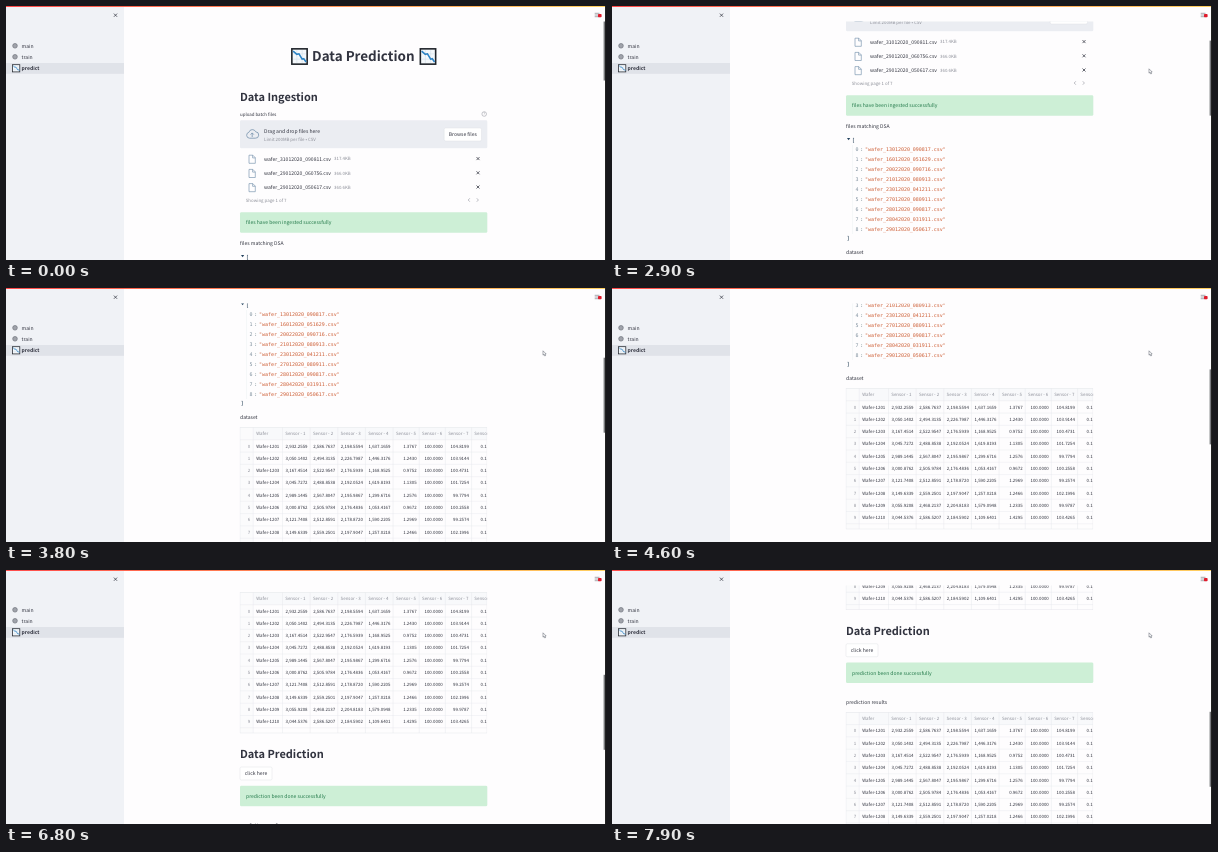
These frames come from a looping animation (600 by 254 pixels, 8000 ms). An HTML page:

```html
<!DOCTYPE html>
<html lang="en">
<head>
<meta charset="utf-8">
<title>Data Prediction</title>
<style>
html, body { margin: 0; width: 100%; height: 100%; overflow: hidden; background: #fefdfe; }
svg { display: block; width: 100vw; height: 100vh; }
text { font-family: "Noto Sans CJK JP", "Noto Sans CJK SC", "Noto Sans CJK", Lato, sans-serif; text-rendering: geometricPrecision; white-space: pre; }
.mono { font-family: "DejaVu Sans Mono", monospace; }
</style>
</head>
<body>
<svg id="stage" viewBox="0 0 600 254">
  <defs>
    <linearGradient id="bar"><stop stop-color="#ff4b4b"/><stop offset="1" stop-color="#ffd060"/></linearGradient>
    <clipPath id="view"><rect x="118" y="15.5" width="482" height="239"/></clipPath>
    <clipPath id="tableClip"><rect x="233.5" y="-1" width="247.7" height="143"/></clipPath>
  </defs>
  <rect width="600" height="254" fill="#fefdfe"/>
  <g clip-path="url(#view)">
    <g id="page"></g>
    <rect id="thumb" x="597.6" width="1.8" height="75" fill="#77787c"/>
  </g>
  <g id="chrome"></g>
  <rect x="599" width="1" height="254" fill="#222"/>
  <path id="cursor" d="M537 62.8v4.4l1-.9.8 1.7.8-.4-.8-1.6h1.4z" fill="#fff" stroke="#555a66" stroke-width=".5"/>
</svg>
<script>
const NS = "http://www.w3.org/2000/svg";
const INK = "#31333f", GREY = "#8d8f99", LINE = "#e4e5ea", STEEL = "#7893ae";
const BODY = 5.05, SMALL = 4.43;
const $ = id => document.getElementById(id);
const page = $("page"), chrome = $("chrome");

function add(parent, tag, attrs, content) {
  const el = document.createElementNS(NS, tag);
  for (const key in attrs) el.setAttribute(key, attrs[key]);
  if (content) el.textContent = content;
  parent.appendChild(el);
  return el;
}
// y is the middle of the capitals
function label(parent, x, y, content, size = BODY, fill = INK, extra = {}) {
  return add(parent, "text", { x, y: y + size * 0.36, "font-size": size, fill, ...extra }, content);
}
const box = (parent, x, y, width, height, fill, extra = {}) =>
  add(parent, "rect", { x, y, width, height, fill, ...extra });
const stroke = (parent, d, color, width, extra = {}) =>
  add(parent, "path", { d, stroke: color, "stroke-width": width, fill: "none", ...extra });
const cross = (parent, x, y, r) =>
  stroke(parent, `M${x - r} ${y - r}l${2 * r} ${2 * r}m0 ${-2 * r}l${-2 * r} ${2 * r}`, INK, 0.75);

function chartIcon(parent, x, y, size) {
  const g = add(parent, "g", { transform: `translate(${x} ${y}) scale(${size / 16})` });
  box(g, 0.8, 0.8, 14.4, 14.4, "#f4f8fb", { stroke: "#20242b", "stroke-width": 1.5 });
  stroke(g, "M5.5 2v12M10.5 2v12M2 5.5h12M2 10.5h12", "#cfdbe6", 0.5);
  stroke(g, "M2 3l3.5 3 2 -.5 3 5 1.5 -.4 2.2 3", "#2d83c4", 1.5);
}

function notice(y, content) {
  box(page, 234, y, 247.3, 20.6, "#cdefd6", { rx: 1.4 });
  label(page, 240, y + 10.4, content, BODY, "#23794a");
}

function button(x, y, width, content) {
  box(page, x, y, width, 13, "#fff", { rx: 1.4, stroke: "#d9dbe1", "stroke-width": 0.4 });
  label(page, x + width / 2, y + 6.5, content, BODY, INK, { "text-anchor": "middle" });
}

function heading(x, y, content, size, extra = {}) {
  label(page, x, y, content, size, INK, { "font-weight": 600, ...extra });
}

function seeded(seed) {
  return () => (seed = (seed * 16807) % 2147483647) / 2147483647;
}

const SENSORS = 8, ROWS = 10, ROW_HEIGHT = 12.3, TABLE_HEIGHT = 140.5;
// Columns are even up to the fifth sensor, then slightly narrower
const columnX = i => 276.5 + 27.65 * i - 1.5 * Math.max(0, i - 4);
const decimals = value => value.toLocaleString("en-US", { minimumFractionDigits: 4, maximumFractionDigits: 4 });

function makeReadings() {
  const random = seeded(1201);
  const around = (middle, spread) => middle + (random() - 0.5) * spread;
  return Array.from({ length: ROWS }, () => [
    around(3050, 240), around(2520, 140), around(2200, 80), around(1400, 700),
    around(1.2, 0.5), 100, around(102, 6)
  ].map(decimals));
}
const readings = makeReadings();

function table(top) {
  const g = add(page, "g", { transform: `translate(0 ${top})`, "clip-path": "url(#tableClip)" });
  box(g, 234, 0, 247, ROW_HEIGHT, "#f8f9fb");
  box(g, 234, 0, 13.2, TABLE_HEIGHT, "#fbfbfc");
  for (let i = 1; i <= ROWS + 1; i++) stroke(g, `M234 ${i * ROW_HEIGHT}h247`, LINE, 0.4);
  stroke(g, `M247.2 0v${TABLE_HEIGHT}`, LINE, 0.4);
  box(g, 234, 0, 247, TABLE_HEIGHT, "none", { stroke: LINE, "stroke-width": 0.5 });
  label(g, 250.3, 6.2, "Wafer", SMALL, GREY);
  for (let i = 0; i < SENSORS; i++) {
    stroke(g, `M${columnX(i)} 0v${TABLE_HEIGHT}`, LINE, 0.4);
    label(g, columnX(i) + 2.8, 6.2, `Sensor - ${i + 1}`, SMALL, GREY);
  }
  readings.forEach((row, i) => {
    const y = 18.5 + i * ROW_HEIGHT;
    label(g, 244.2, y, `${i}`, SMALL, GREY, { "text-anchor": "end" });
    label(g, 250.3, y, `Wafer-${1201 + i}`, SMALL);
    row.forEach((cell, c) => label(g, columnX(c + 1) - 2.6, y, cell, SMALL, INK, { "text-anchor": "end" }));
    label(g, 474.5, y, "0.1", SMALL);
  });
}

function buildUpload() {
  chartIcon(page, 285, 42, 17);
  heading(357.3, 50.5, "Data Prediction", 13.45, { "text-anchor": "middle" });
  chartIcon(page, 413.5, 42, 17);
  heading(234, 90.7, "Data Ingestion", 10.97);
  label(page, 234, 108, "upload batch files", SMALL);
  add(page, "circle", { cx: 478.2, cy: 108, r: 2.3, fill: "none", stroke: GREY, "stroke-width": 0.5 });
  label(page, 478.2, 108, "?", 3.6, GREY, { "text-anchor": "middle" });

  box(page, 234, 114.3, 247.3, 28, "#ebedf2", { rx: 1.4 });
  stroke(page, "M243.5 132.2a3 3 0 0 1-.6-5.9a3.6 3.6 0 0 1 6.8-.5a3.2 3.2 0 0 1-.4 6.4zM246.2 131v-4m-1.6 1.6l1.6-1.7l1.6 1.7",
    STEEL, 0.8, { "stroke-linejoin": "round" });
  label(page, 258, 124.7, "Drag and drop files here");
  label(page, 258, 133.5, "Limit 200MB per file • CSV", SMALL, GREY);
  button(438.2, 122, 37.3, "Browse files");

  const files = [["31012020_090811", "317.4KB"], ["29012020_060756", "366.0KB"], ["29012020_050617", "360.6KB"]];
  files.forEach(([name, size], i) => {
    const y = 152.8 + i * 14.2;
    stroke(page, `M243 ${y - 3.6}h3.8l2.5 2.5v5.6h-6.3zM246.6 ${y - 3.6}v2.7h2.7`, STEEL, 0.65);
    label(page, 258, y, `wafer_${name}.csv`);
    label(page, 328, y, size, SMALL, GREY);
    cross(page, 472, y - 0.2, 1.5);
  });
  label(page, 239.7, 194, "Showing page 1 of 7", SMALL, GREY);
  stroke(page, "M463.8 192.3l-1.6 1.7l1.6 1.7M470.8 192.3l1.6 1.7l-1.6 1.7", GREY, 0.6);
  notice(206.2, "files have been ingested successfully");
}

function buildMatches() {
  const mono = (x, y, content, fill, size = 4.98) => label(page, x, y, content, size, fill, { class: "mono" });
  const names = ["13012020_090817", "16012020_051629", "20022020_090716", "21012020_080913", "23012020_041211",
    "27012020_080911", "28012020_090817", "28042020_031911", "29012020_050617"];
  label(page, 234, 237.4, "files matching DSA");
  add(page, "path", { d: "M235 249h3.2l-1.6 2.2z", fill: "#21405c" });
  mono(239.8, 251.2, "[", "#16324a", 5.4);
  names.forEach((name, i) => {
    const y = 260.2 + i * 10.02;
    mono(243.6, y, `${i}`, "#7e8f9d");
    mono(248.2, y, ":", "#586e75");
    mono(253, y, `"wafer_${name}.csv"`, "#cd5c33");
  });
  stroke(page, "M240.6 256v89", "#e6eaee", 0.4);
  mono(234.6, 349.3, "]", "#16324a", 5.4);
}

function buildResults() {
  label(page, 234, 363, "dataset");
  table(373.5);
  heading(234, 535.5, "Data Prediction", 10.97);
  button(234, 548, 32, "click here");
  notice(566.7, "prediction been done successfully");
  label(page, 234, 606, "prediction results");
  table(616.5);
}

function buildChrome() {
  box(chrome, 0, 0, 118, 254, "#f0f2f6");
  cross(chrome, 109.5, 9.2, 1.6);
  box(chrome, 0, 57, 118, 10.8, "#e0e3e9");
  ["main", "train"].forEach((name, i) => {
    const y = 39.8 + 11 * i;
    add(chrome, "circle", { cx: 9, cy: y, r: 2.3, fill: "#a0a3ab", stroke: "#70747d", "stroke-width": 0.7 });
    label(chrome, 15.6, y, name);
  });
  chartIcon(chrome, 6.2, 58.3, 8);
  label(chrome, 15.6, 62, "predict", BODY, INK, { "font-weight": 600 });
  stroke(chrome, "M588.7 7.3h4.8M588.7 9h4.8M588.7 10.7h4.8", "#85868e", 0.7);
  box(chrome, 592, 8, 3.6, 3.2, "#e01b2c", { rx: 0.8 });
  box(chrome, 0, 0, 600, 1, "url(#bar)");
}

// Bursts of wheel notches: start time and count
const bursts = [[1100, 2], [2750, 1], [3150, 3], [4150, 1], [4900, 1], [6600, 3], [7450, 1], [7862, 1]];
const NOTCH_STEP = 39, NOTCH_TIME = 150, NOTCH_GAP = 200, LOOP = 8000, FRAME = 100;

function ease(p) {
  p = Math.min(1, Math.max(0, p));
  return p * p * (3 - 2 * p);
}

function scrollAt(t) {
  let notches = 0;
  for (const [start, count] of bursts)
    for (let i = 0; i < count; i++) notches += ease((t - start - i * NOTCH_GAP) / NOTCH_TIME);
  return notches * NOTCH_STEP;
}

function render(time) {
  const t = Math.floor((time % LOOP) / FRAME) * FRAME;
  const scroll = scrollAt(t);
  page.setAttribute("transform", `translate(0 ${-scroll})`);
  $("thumb").setAttribute("y", scroll * 0.3 - 0.5);
  $("cursor").setAttribute("visibility", t < 500 ? "hidden" : "visible");
}

buildUpload();
buildMatches();
buildResults();
buildChrome();
const start = performance.now();
function tick() {
  render(performance.now() - start);
  requestAnimationFrame(tick);
}
tick();
</script>
</body>
</html>
```
